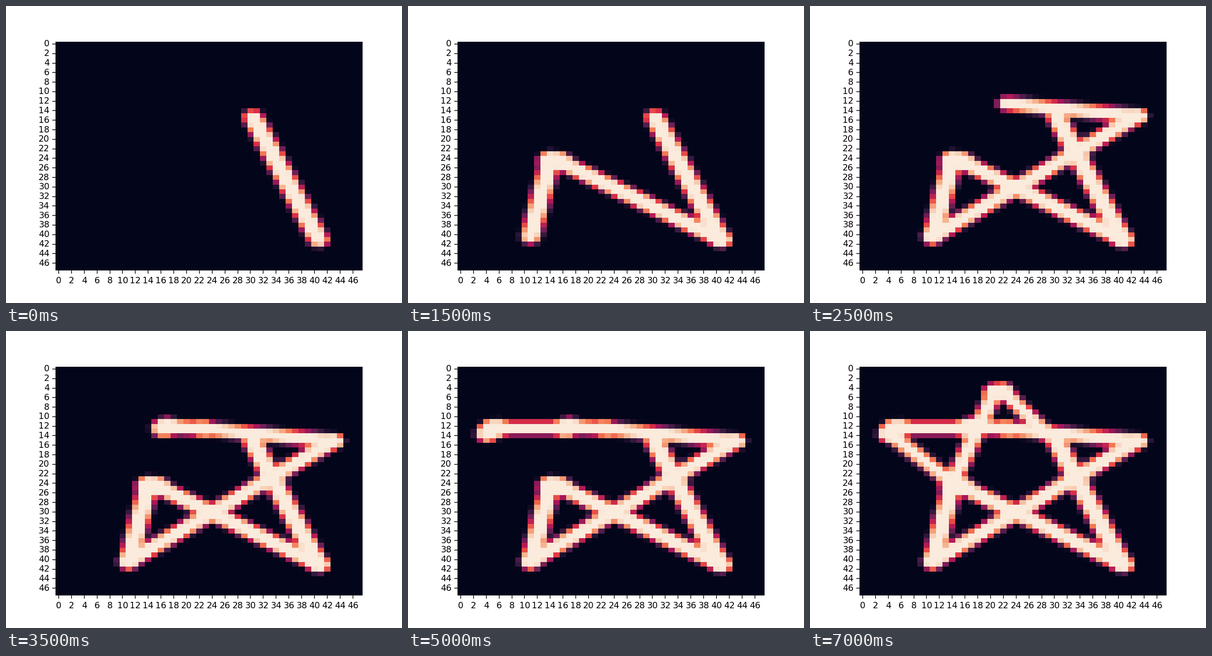
These frames come from a looping animation (864x648 px, 7500 ms). A matplotlib script:

```python
import numpy as np
import matplotlib.pyplot as plt
from matplotlib.animation import FuncAnimation
from matplotlib.colors import LinearSegmentedColormap

SIZE = 48
SOFT = 0.8  # half width of the soft stroke edge, in cells

# Corners of the star in drawing order; nearby pairs are pen jogs
PATH = np.array([
    (30.4, 15.4), (40.65, 41.0), (15.4, 24.6), (14.05, 24.4),
    (10.95, 40.4), (42.95, 15.15), (22.6, 12.5), (16.9, 12.1),
    (16.4, 12.4), (5.7, 12.4), (4.8, 12.6), (4.15, 13.6),
    (14.1, 23.8), (20.65, 4.75), (21.9, 4.6), (28.95, 13.8)])
STROKES = len(PATH) - 1

ROCKET = LinearSegmentedColormap.from_list("rocket", [
    "#03051a", "#35193e", "#701f57", "#ad1759",
    "#e13342", "#f37651", "#f6b48f", "#faebdd"])

rows, cols = np.mgrid[:SIZE, :SIZE].astype(float)


def coverage(i):
    """Soft coverage of stroke i, a round-capped line, on the grid."""
    (x, y), (dx, dy) = PATH[i], PATH[i + 1] - PATH[i]
    length = np.hypot(dx, dy)
    # The line thins as the pen goes on; short jogs leave a wider blot.
    radius = 1.58 - 0.02 * i + 0.55 * np.exp(-length / 3)
    t = np.clip(((cols - x) * dx + (rows - y) * dy) / length**2, 0, 1)
    edge = np.hypot(cols - x - t * dx, rows - y - t * dy) - radius
    s = np.clip(0.5 - edge / (2 * SOFT), 0, 1)
    return s * s * (3 - 2 * s)


def canvas(count):
    """The sketch after the first `count` strokes."""
    return 1 - np.prod([1 - coverage(i) for i in range(count)], axis=0)


fig, ax = plt.subplots(figsize=(6.4, 4.8), dpi=135)
mesh = ax.pcolormesh(canvas(1), cmap=ROCKET, vmin=0, vmax=1)
ax.set(xlim=(0, SIZE), ylim=(SIZE, 0))
ax.spines[:].set_visible(False)

labels = np.arange(0, SIZE, 2)
ax.set_xticks(labels + 0.5, labels)
ax.set_yticks(labels + 0.5, labels, va="center")


def update(i):
    mesh.set_array(canvas(i + 1))
    return [mesh]


anim = FuncAnimation(fig, update, frames=STROKES, interval=500,
                     repeat=True, repeat_delay=0)
plt.show()
```
